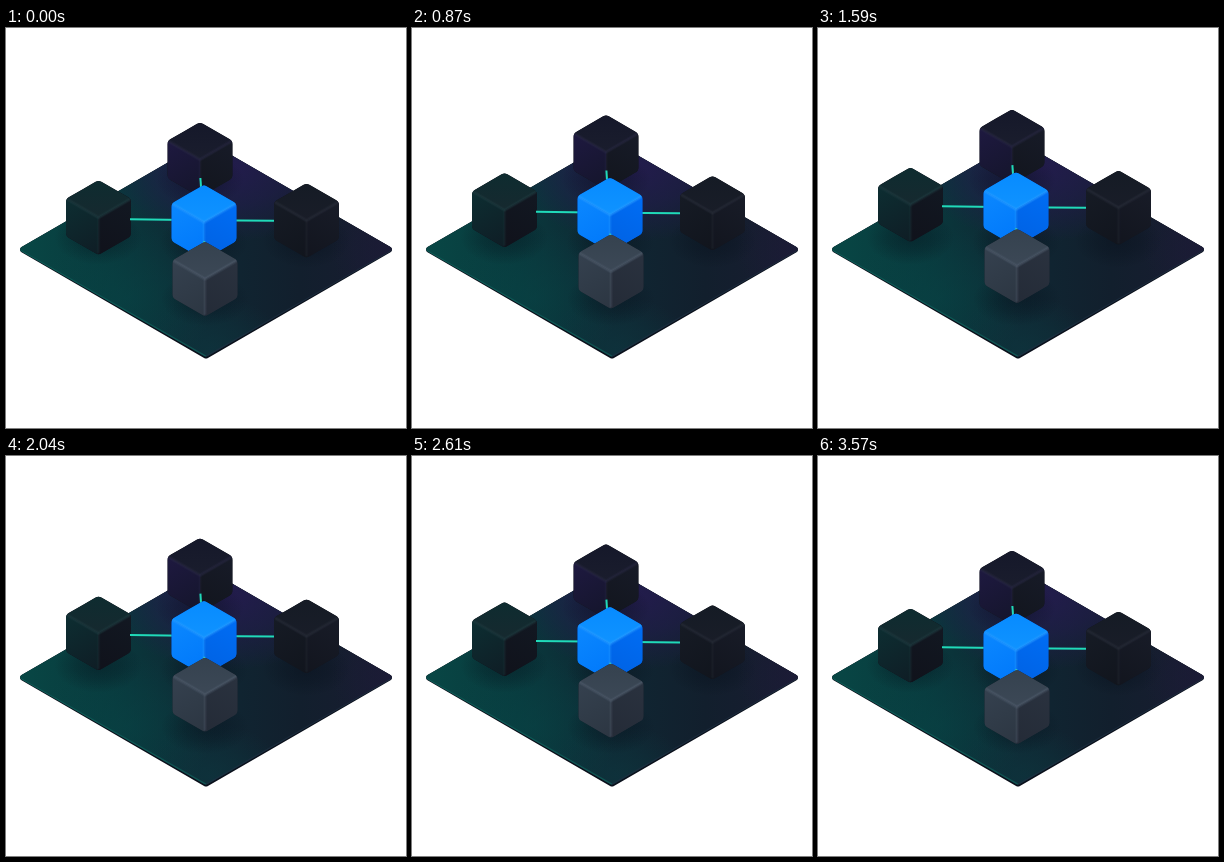
These frames come from a looping animation (400x400 px, 3600 ms). An HTML page with a canvas:

```html
<!DOCTYPE html>
<html lang="en">
<head>
<meta charset="utf-8">
<title>Floating cubes</title>
<style>
html, body { margin: 0; width: 100%; height: 100%; overflow: hidden; background: #fff; }
canvas { display: block; width: 400px; height: 400px; }
</style>
</head>
<body>
<canvas id="stage" width="400" height="400"></canvas>
<script>
const ctx = document.getElementById('stage').getContext('2d');
const LOOP = 3600, STEP = 30, PEAK = 1700, RISE = 13;
const W = 32.5, H = 37.5, HALF = H / 2;

// Each face is a pair of colours, running from its outer side to its inner one.
const cubes = {
  back: { x: 194, y: 131.6, top: ['#15182a', '#1a1d2d'], left: ['#1e1940', '#14152b'], right: ['#171b28', '#12151d'], edge: '#292a45' },
  left: { x: 92.5, y: 189.6, top: ['#0e2c30', '#16292f'], left: ['#0d2e32', '#0f1d25'], right: ['#121822', '#10121b'], edge: '#203d43' },
  right: { x: 300.5, y: 192.6, top: ['#151b25', '#191d28'], left: ['#161b25', '#11151d'], right: ['#181c28', '#12151e'], edge: '#292e3b' },
  center: { x: 198, y: 194.3, top: ['#078bff', '#1093ff'], left: ['#0b88ff', '#0077fa'], right: ['#006df4', '#0061e2'], edge: '#2b9dff' },
  front: { x: 199, y: 251, top: ['#35424f', '#3c4856'], left: ['#35414f', '#2c3642'], right: ['#2a323f', '#242b37'], edge: '#505d6c' }
};

function polygon(points) {
  ctx.beginPath();
  points.forEach(([x, y]) => ctx.lineTo(x, y));
  ctx.closePath();
}

function rounded(points, radius) {
  const last = points[points.length - 1];
  ctx.beginPath();
  ctx.moveTo((last[0] + points[0][0]) / 2, (last[1] + points[0][1]) / 2);
  points.forEach((p, i) => {
    const next = points[(i + 1) % points.length];
    ctx.arcTo(p[0], p[1], next[0], next[1], radius);
  });
  ctx.closePath();
}

function shade(x0, y0, x1, y1, colors) {
  const g = ctx.createLinearGradient(x0, y0, x1, y1);
  colors.forEach((c, i) => g.addColorStop(i / (colors.length - 1), c));
  return g;
}

function glow(x, y, radius, rgb, alpha, squash = 1) {
  ctx.save();
  ctx.translate(x, y);
  ctx.scale(1, squash);
  const g = ctx.createRadialGradient(0, 0, 0, 0, 0, radius);
  g.addColorStop(0, `rgba(${rgb},${alpha})`);
  g.addColorStop(0.5, `rgba(${rgb},${alpha * 0.6})`);
  g.addColorStop(1, `rgba(${rgb},0)`);
  ctx.fillStyle = g;
  ctx.fillRect(-radius, -radius, radius * 2, radius * 2);
  ctx.restore();
}

function line(points, color, width) {
  ctx.beginPath();
  points.forEach(([x, y]) => ctx.lineTo(x, y));
  ctx.strokeStyle = color;
  ctx.lineWidth = width;
  ctx.stroke();
}

function drawPlate() {
  ctx.save();
  rounded([[200, 112.5], [389, 221.7], [200, 331], [11, 221.7]], 3);
  ctx.fillStyle = '#0a101b';
  ctx.fill();
  ctx.clip();
  rounded([[200, 112.5], [389, 221], [200, 329], [11, 221]], 3);
  ctx.fillStyle = shade(13, 222, 387, 222, ['#084745', '#09393d', '#0f2733', '#121f2d', '#191c31']);
  ctx.fill();
  ctx.clip();
  glow(220, 140, 120, '36,27,78', 0.95, 0.62);
  glow(120, 270, 90, '7,70,71', 0.5, 0.8);
  glow(205, 320, 75, '13,56,64', 0.6, 0.7);
  glow(385, 220, 60, '29,27,57', 0.6);
  line([[13, 222], [200, 328.5]], 'rgba(18,105,98,.6)', 2);
  line([[200, 328.5], [387, 222]], 'rgba(30,48,66,.7)', 1.5);
  for (const { x, y } of Object.values(cubes)) {
    glow(x, y + 20, 44, '6,14,25', 0.42, 0.62);
  }
  ctx.restore();
}

function drawCube({ x, y, top, left, right, edge }, lift) {
  ctx.save();
  ctx.translate(x, y - lift);
  rounded([[0, -H], [W, -HALF], [W, HALF], [0, H], [-W, HALF], [-W, -HALF]], 6);
  ctx.fillStyle = right[1];
  ctx.fill();
  ctx.clip();

  polygon([[0, -H], [W, -HALF], [0, 0], [-W, -HALF]]);
  ctx.fillStyle = shade(0, -H, 0, 0, top);
  ctx.fill();
  polygon([[-W, -HALF], [0, 0], [0, H], [-W, HALF]]);
  ctx.fillStyle = shade(-W, -HALF, 0, H, left);
  ctx.fill();
  polygon([[W, -HALF], [0, 0], [0, H], [W, HALF]]);
  ctx.fillStyle = shade(W, -HALF, 0, H, right);
  ctx.fill();

  ctx.lineCap = ctx.lineJoin = 'round';
  for (const [width, alpha] of [[4, 0.22], [2, 0.4]]) {
    ctx.globalAlpha = alpha;
    line([[-W + 2, -HALF + 1], [0, 0], [W - 2, -HALF + 1]], edge, width);
    ctx.globalAlpha = alpha * 0.5;
    line([[0, 0], [0, H - 3]], edge, width);
  }
  ctx.restore();
}

function drawLinks(lift) {
  ctx.save();
  ctx.translate(0, -lift);
  const color = '#20dab9';
  line([[124, 191.3], [198, 192.2], [268, 192.8]], color, 2);
  line([[194.4, 150], [195.2, 162]], color, 2);
  ctx.restore();
}

// A cosine swing that lingers a little at both ends.
function liftAt(t) {
  const swing = (1 + Math.cos((t - PEAK) / LOOP * 2 * Math.PI)) / 2;
  const eased = swing * swing * (3 - 2 * swing);
  return RISE * (swing + eased) / 2;
}

function draw(now) {
  const lift = liftAt(Math.floor((now % LOOP) / STEP) * STEP);
  ctx.clearRect(0, 0, 400, 400);
  drawPlate();
  drawCube(cubes.back, lift);
  drawCube(cubes.left, lift);
  drawCube(cubes.right, lift);
  drawLinks(lift);
  drawCube(cubes.center, lift);
  line([[198.2, 213 - lift], [198.4, 218 - lift]], '#2fbfc0', 2);
  drawCube(cubes.front, lift);
}

let start;
function tick(now) {
  start ??= now;
  draw(now - start);
  requestAnimationFrame(tick);
}
draw(0);
requestAnimationFrame(tick);
</script>
</body>
</html>
```
